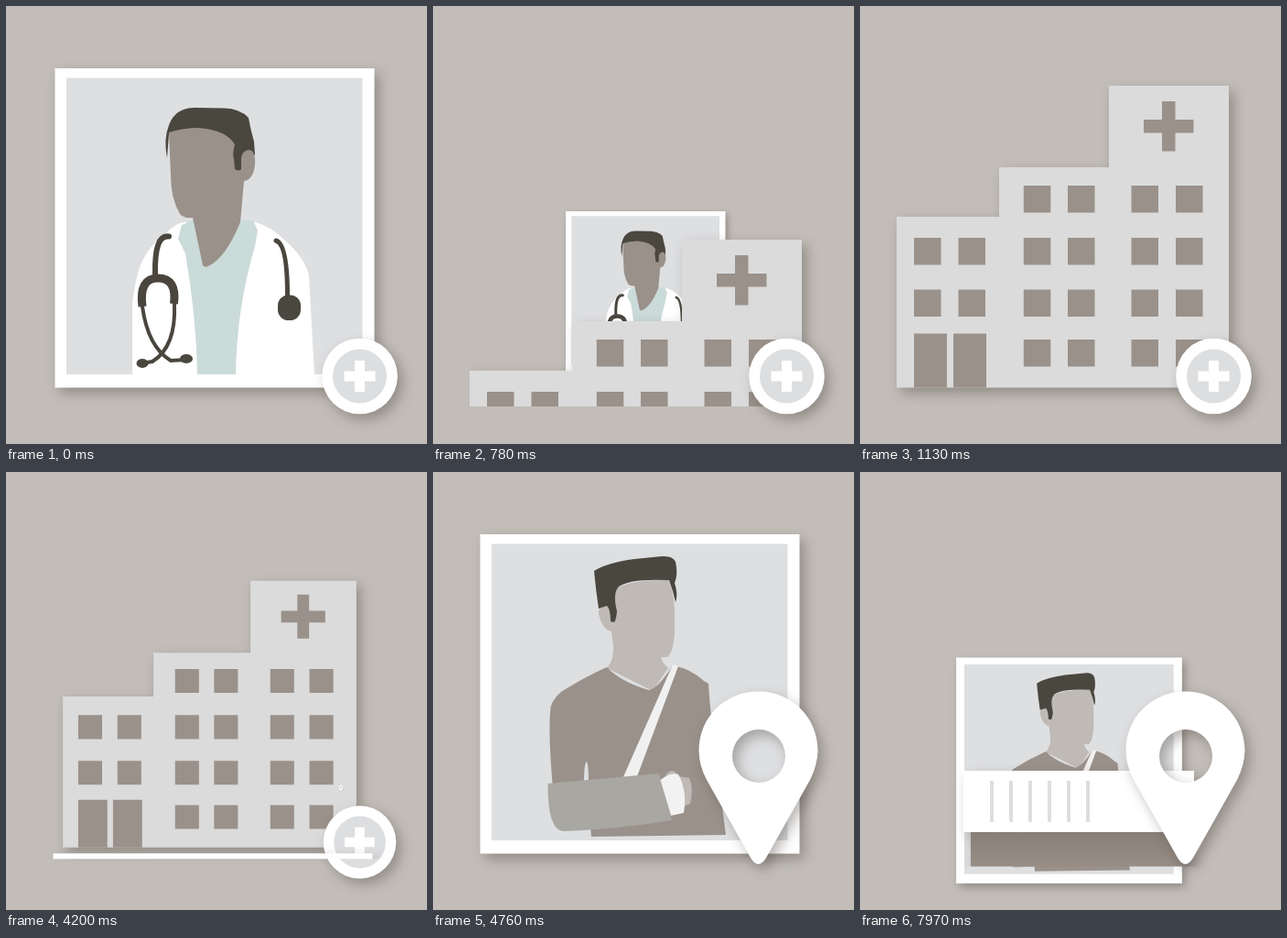
An HTML page that plays this animation: 460x478 px, repeating every 8000 ms.

```html
<!DOCTYPE html>
<html lang="en">
<head>
<meta charset="utf-8">
<title>Clinic cards</title>
<style>
  html, body { margin: 0; width: 100%; height: 100%; overflow: hidden; background: #c2bdb8; }
  svg { display: block; width: 460px; height: 478px; }
  .shade { filter: drop-shadow(5px 6px 7px rgba(60, 52, 46, .36)); }
  .white { fill: #fff; }
  .pane { fill: #dedfe1; }
  .dark { fill: #4a473f; }
  .brown { fill: #9a918a; }
  .light { fill: #bfbab5; }
  .tube { fill: none; stroke: #4a463e; stroke-linecap: round; }
</style>
</head>
<body>
<svg viewBox="0 0 460 478">
  <defs>
    <clipPath id="reveal"><rect id="window" x="40" width="420" height="421"/></clipPath>
    <linearGradient id="wall" x2="0" y2="1">
      <stop stop-color="#887f77"/><stop offset=".12" stop-color="#978d85"/>
    </linearGradient>
  </defs>

  <g id="doctor"><g class="shade">
    <path class="white" d="M53.5 68h349v348.5h-349z"/>
    <path class="pane" d="M66 78.500h323.500v323.500H66z"/>
    <path class="white" d="M138 403V325Q143 285 152 273Q160 258 176 247Q185 237 195 236H273Q290 241 305 256Q326 274 331 294L337 403Z"/>
    <path fill="#cbdbd9" d="M192 239L203 234H270L275 245L272 262Q252 330 251 402H209Q208 340 196 270L188 254Z"/>
    <path class="dark" d="M176 166Q172 145 178 130Q185 111 206 111L238 111.500Q256 112 265 122Q267 134 271 148L272 162L258 179Q254 182 249 178L240 150L178 140Z"/>
    <path class="brown" d="M178 138Q194 133 210 133Q240 135 250 151Q247 162 249 167L250 178Q254 181 257 178V166Q258 158 265 157Q273 157 272 173Q270 190 260 191L256 236Q240 275 221 284Q217 286 215 283L204 231Q194 232 190 227Q180 210 180 185Z"/>
    <g class="tube" stroke-width="4">
      <path stroke-width="6" d="M178 251.500Q162 249 163 293"/>
      <path stroke-width="9" stroke-linecap="butt" d="M149 328Q145 297 166 297Q187 297 183.500 325"/>
      <path d="M149 328Q155 372 180 387L197 386M184 325Q186 372 160 388L148 390"/>
      <path stroke-width="5" d="M295 256Q308 260 307.500 320"/>
    </g>
    <g class="dark">
      <ellipse cx="149" cy="390" rx="6.500" ry="5"/>
      <ellipse cx="197" cy="385" rx="7" ry="5"/>
      <rect x="297" y="315.500" width="25" height="27.500" rx="11.500"/>
    </g>
  </g></g>

  <g id="hospital"><g class="shade">
    <path fill="#dbdbdb" d="M40 416.500V230H152V176H272V87H403V416.500Z"/>
    <path class="brown" d="M310 124h20v-20h14.500v20h20v14.500h-20v20h-14.500v-20h-20zM59 357.500h36v59H59zM102 357.500h36v59h-36z"/>
    <path id="panes" class="brown"/>
  </g></g>

  <g id="badge"><g class="shade">
    <circle class="white" cx="386.500" cy="404" r="41.300"/>
    <circle fill="#dddee0" cx="386.500" cy="404" r="29.500"/>
    <path class="white" d="M369.500 398.500h11.500v-11.500h11v11.500h11.500v11h-11.500v11.500h-11v-11.500h-11.500z"/>
  </g></g>

  <g id="patient"><g class="shade">
    <path class="white" d="M51.500 68h349v348.500h-349z"/>
    <path class="pane" d="M64 78.500h323.500v323.500H64z"/>
    <path class="light" d="M199 128Q215 117 258 118Q265 140 264 160Q265 195 256 202H249Q250 208 257 214L240 239L190 214Q198 205 197 190L195 174Q185 172 181 155Q181 145 188 145Q194 146 196 158Z"/>
    <path class="dark" d="M176 108Q190 99 220 95L250 92Q262 91 265 98Q268 112 264 121Q268 134 265 142L262 130L258 118Q215 116 203 125Q196 132 201 152Q200 162 198 164L194 163Q194 150 190 146L181 149Q178 130 176 108Z"/>
    <path class="brown" d="M190 213Q205 229 236 238Q246 236 262 211Q282 215 296 228L301 231Q303 270 320 396L173 398L168 345H131Q126 290 128 262Q128 250 140 240Q165 224 190 213Z"/>
    <path class="pane" d="M165 340Q165 317 168 316Q170 320 170 340Z"/>
    <path fill="#f0f0f0" d="M262 210L268 212L222 335H207Z"/>
    <path fill="#a9a7a1" d="M125.500 340L247 329L261 380Q200 390 142 392Q125 390 125.500 340Z"/>
    <path class="light" d="M254 331Q262 321 268 332L280 334Q285 345 281 362L272 366Z"/>
    <path fill="#f2f2f2" d="M248.500 336Q260 327 268 330Q278 348 274 372L260 375Z"/>
  </g></g>

  <g id="store"><g class="shade">
    <path fill="url(#wall)" d="M121 147h236v300H121z"/>
    <path class="white" d="M113 80h252v67H113z"/>
    <path stroke="#dddee0" stroke-width="4" d="M144 91v45m21 -45v45m21 -45v45m21 -45v45m21 -45v45m21 -45v45"/>
  </g></g>

  <g id="pin"><g class="shade">
    <path class="white" fill-rule="evenodd" d="M355.500 239.500C392 239.500 420.500 268 420.500 304Q420 320 412 336L364 421Q355.500 435 347 421L299 336Q290.500 320 290.500 304C290.500 268 319 239.500 355.500 239.500ZM327 310a29 29 0 1 0 58 0a29 29 0 1 0 -58 0Z"/>
  </g></g>
</svg>
<script>
const LOOP = 8000, STEP = 70, SPAN = 580;
const $ = id => document.getElementById(id);

let panes = '';
const addPanes = (xs, ys) => {
  for (const x of xs) for (const y of ys) panes += `M${x} ${y}h29.500v29.500h-29.500z`;
};
addPanes([59, 107.5], [253, 309.5]);
addPanes([178.800, 227, 296.500, 345], [196, 253, 309.5, 364]);
$('panes').setAttribute('d', panes);

const ease = p => p < .5 ? 2 * p * p : 1 - 2 * (1 - p) ** 2;

// Progress of a move that first shows at `from`; motion ticks every STEP ms.
function progress(t, from, start) {
  if (t < from) return 0;
  const tick = from + Math.floor((t - from) / STEP) * STEP;
  return ease(Math.min(1, (tick - start) / SPAN));
}

// Scale towards the fixed point (x, y).
function shrink(id, s, x, y) {
  $(id).style.display = s > 0 ? '' : 'none';
  $(id).firstElementChild.setAttribute('transform',
    `translate(${(1 - s) * x} ${(1 - s) * y}) scale(${s})`);
}

// Slide up from behind a lower edge that sinks as the move goes on.
function rise(id, e, depth) {
  const el = $(id);
  el.style.display = e > 0 ? '' : 'none';
  if (e > 0 && e < 1) {
    el.setAttribute('clip-path', 'url(#reveal)');
    $('window').setAttribute('height', 421 + 32 * e);
    el.firstElementChild.setAttribute('transform', `translate(0 ${(1 - e) * depth})`);
  } else {
    el.removeAttribute('clip-path');
  }
}

function draw(t) {
  const toHospital = progress(t, 500, 490);
  const leaveHospital = progress(t, 4200, 4060);
  const toPatient = progress(t, 4200, 4120);
  const toStore = progress(t, 7830, 7748);

  shrink('doctor', 1 - toHospital, 236.5, 380);
  shrink('hospital', 1 - leaveHospital, 230, 359);
  shrink('badge', 1 - toPatient, 386.5, 404);
  shrink('patient', 1 - toStore, 234.5, 527);
  shrink('pin', toPatient, 366.5, 345.5);
  if (leaveHospital === 0) rise('hospital', toHospital, 336);
  rise('patient', toPatient, 362);
  rise('store', toStore, 348);
}

function loop(now) {
  draw(now % LOOP);
  requestAnimationFrame(loop);
}
draw(0);
requestAnimationFrame(loop);
</script>
</body>
</html>
```
